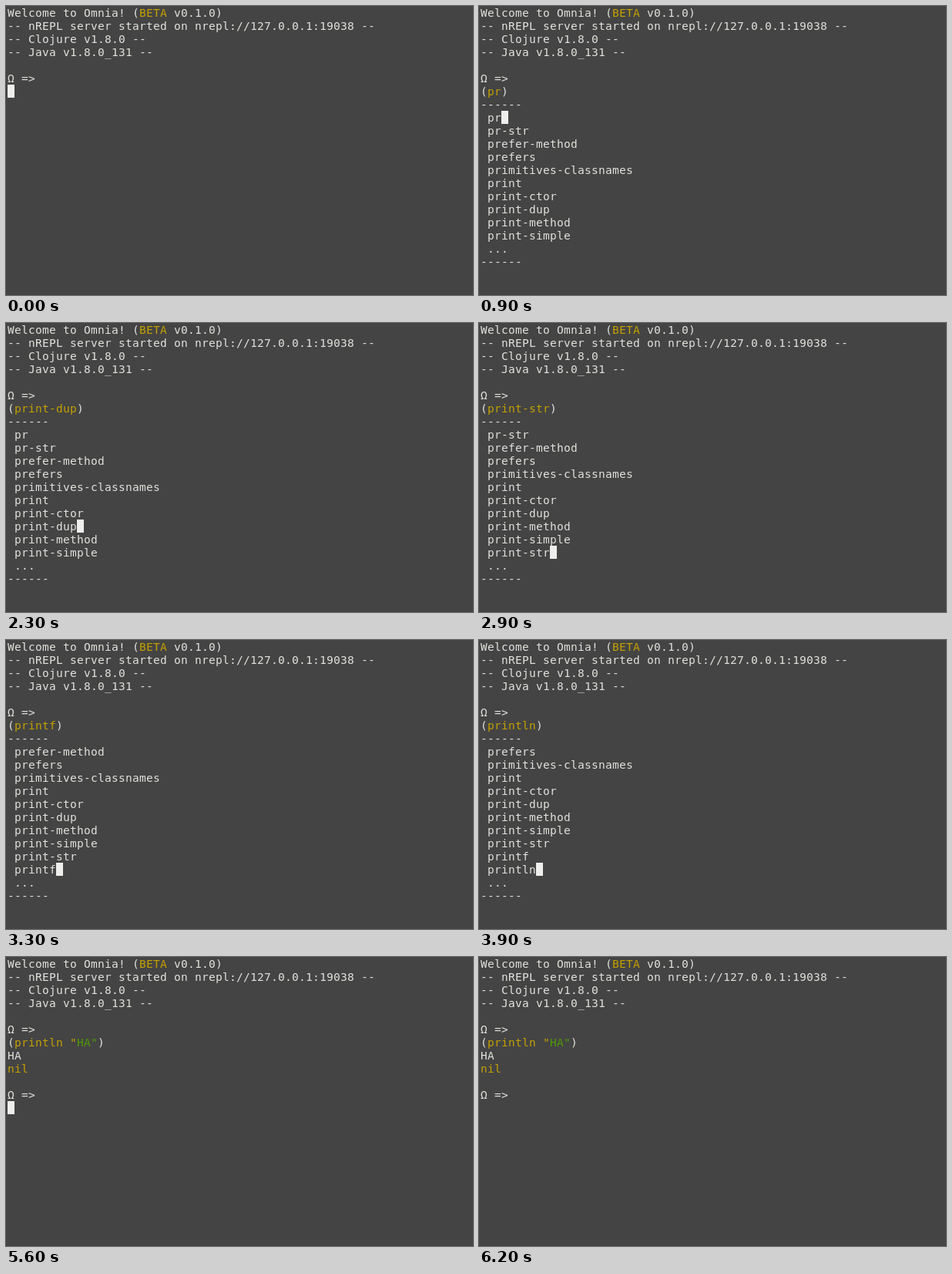
Recreate the animation shown at these times as an HTML page. Size 606 px wide and 375 px high, loop 6500 ms.

```html
<!DOCTYPE html>
<html lang="en">
<head>
<meta charset="utf-8">
<title>REPL session</title>
<style>
  html, body { margin: 0; width: 100%; height: 100%; overflow: hidden; background: #444; }
  #screen {
    position: absolute; left: 2px; top: 0; margin: 0;
    font: 14.5px/17px "DejaVu Sans Mono", monospace;
    letter-spacing: .271px; font-variant-ligatures: none;
    white-space: pre; color: #e0e2dc;
  }
  .row { position: relative; top: 1px; height: 17px; }
  .yellow { color: #c4a000; }
  .green { color: #4e9a06; }
  .cursor {
    position: absolute; box-sizing: border-box; width: 9px; height: 17px; padding-top: 1px;
    overflow: hidden; background: #eeeeec; color: #444;
  }
  .cursor.green { background: #4e9a06; color: #444; }
</style>
</head>
<body>
<div id="screen"></div>
<script>
const LOOP = 6500, CELL_W = 9, CELL_H = 17, INPUT_ROW = 6, MENU_SIZE = 10;
const screen = document.getElementById('screen');

const span = (color, text) => `<span class="${color}">${text}</span>`;
const yellow = text => span('yellow', text);
const green = text => span('green', text);

const header = [
  `Welcome to Omnia! (${yellow('BETA')} v0.1.0)`,
  '-- nREPL server started on nrepl://127.0.0.1:19038 --',
  '-- Clojure v1.8.0 --',
  '-- Java v1.8.0_131 --',
  '',
  'Ω =&gt;'
];

const words = ['pr', 'pr-str', 'prefer-method', 'prefers', 'primitives-classnames',
  'print', 'print-ctor', 'print-dup', 'print-method', 'print-simple',
  'print-str', 'printf', 'println'];

const cursorAt = (col, row, char = '', color = '') => ({ col, row, char, color });

// The cursor sits on the closing parenthesis while a symbol is typed.
const typing = text => ({
  rows: [`(${yellow(text)})`],
  cursor: cursorAt(text.length + 1, INPUT_ROW, ')')
});

const quoting = text => ({
  rows: [`(${yellow('println "')}${green(text + '"')})`],
  cursor: cursorAt(10 + text.length, INPUT_ROW, '"', 'green')
});

// The list scrolls once the selection passes its last visible line.
const menu = index => {
  const first = Math.max(0, index - MENU_SIZE + 1);
  const visible = words.slice(first, first + MENU_SIZE).map(word => ' ' + word);
  return {
    rows: [`(${yellow(words[index])})`, '------', ...visible, ' ...', '------'],
    cursor: cursorAt(words[index].length + 1, INPUT_ROW + 2 + index - first)
  };
};

const result = cursor => ({
  rows: [...quoting('HA').rows, 'HA', yellow('nil'), '', 'Ω =&gt;'],
  cursor
});

const menuTimes = [900, 1200, 1400, 1500, 1800, 2000, 2200, 2300, 2600, 2800, 2900, 3300, 3900];

const steps = [
  [0, { rows: [], cursor: cursorAt(0, INPUT_ROW) }],
  [300, typing('')],
  [500, typing('p')],
  [600, typing('pr')],
  ...menuTimes.map((time, index) => [time, menu(index)]),
  [4200, typing('println ')],
  [4800, quoting('')],
  [5100, quoting('H')],
  [5200, quoting('HA')],
  [5600, result(cursorAt(0, 11))],
  [6200, result(null)]
];

function draw({ rows, cursor }) {
  const lines = [...header, ...rows].map(row => `<div class="row">${row}</div>`).join('');
  const block = cursor
    ? `<span class="cursor ${cursor.color}" style="left:${cursor.col * CELL_W}px;top:${cursor.row * CELL_H}px">${cursor.char}</span>`
    : '';
  screen.innerHTML = lines + block;
}

const start = performance.now();
let shown = null;

function tick() {
  const time = (performance.now() - start) % LOOP;
  const state = steps.findLast(([from]) => from <= time)[1];
  if (state !== shown) draw(shown = state);
  requestAnimationFrame(tick);
}
tick();
</script>
</body>
</html>
```
